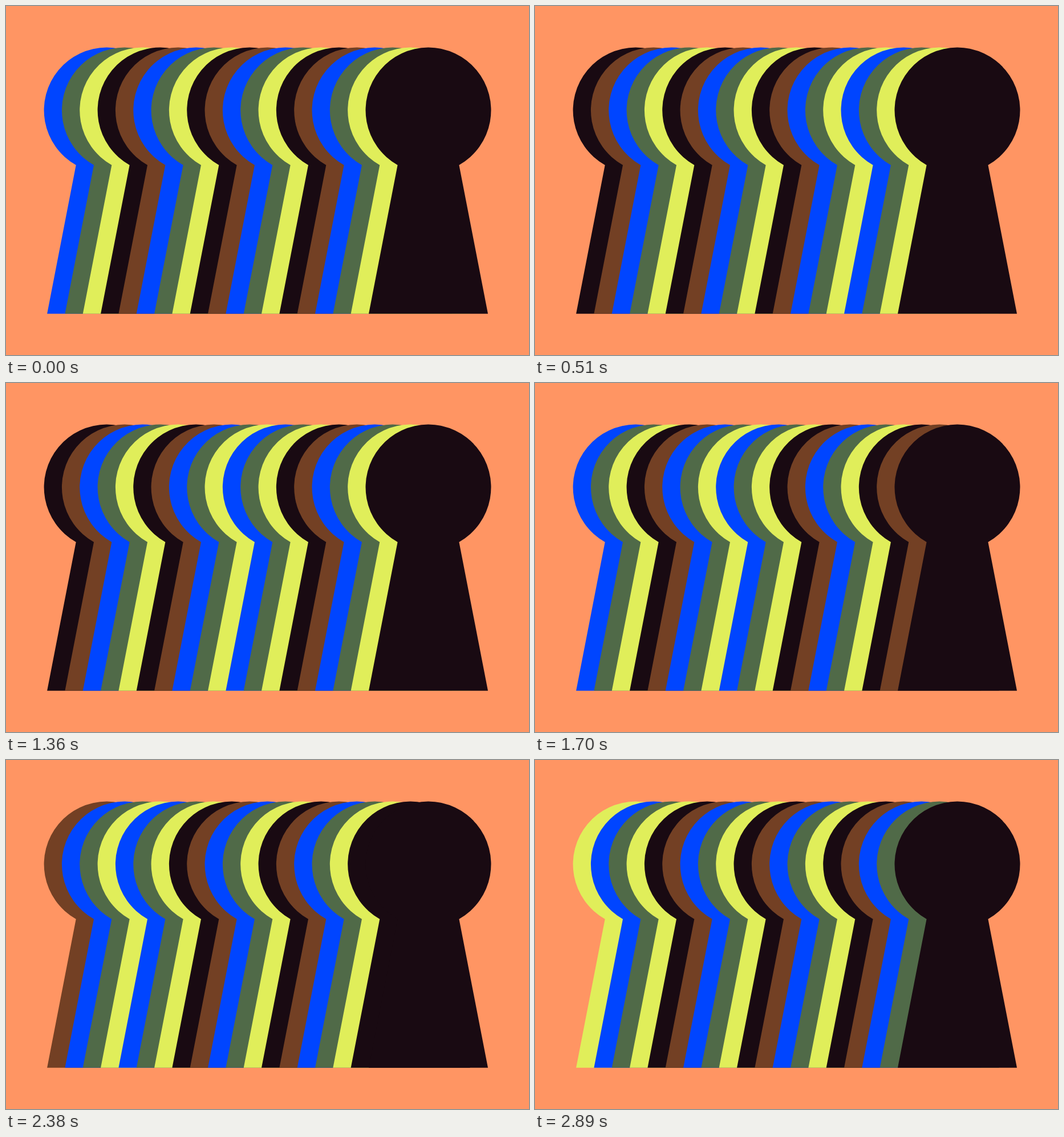
These frames come from a looping animation (917 by 611 pixels, 3.06 s). An HTML page:

```html
<!DOCTYPE html>
<html lang="en">
<head>
<meta charset="utf-8">
<title>Keyhole stripes</title>
<style>
  html, body { margin: 0; width: 100%; height: 100%; overflow: hidden; background: #ff9563; }
  svg { display: block; width: 100vw; height: 100vh; }
</style>
</head>
<body>
<svg id="stage" viewBox="0 0 917 611"></svg>
<script>
  const PALETTE = ['#0045ff', '#506a48', '#e0ee5a', '#190a12', '#734024'];
  const FRONT_COLOR = '#190a12';
  const COUNT = 18;
  const STEP_MS = 170;
  const FIRST_X = 176.6;
  const FRONT_X = 740.5;

  // Keyhole outline centred on x = 0: round head on a flared base.
  const KEYHOLE = 'M-104.5 538.8 L-53.9 278.4 A110 110 0 1 1 53.9 278.4 L104.5 538.8 Z';

  const stage = document.getElementById('stage');

  function addKeyhole(x) {
    const path = document.createElementNS('http://www.w3.org/2000/svg', 'path');
    path.setAttribute('d', KEYHOLE);
    path.setAttribute('transform', `translate(${x} 0)`);
    path.setAttribute('fill', FRONT_COLOR);
    stage.append(path);
    return path;
  }

  const spacing = (FRONT_X - FIRST_X) / COUNT;
  const stripes = Array.from({ length: COUNT }, (_, i) => addKeyhole(FIRST_X + i * spacing));
  addKeyhole(FRONT_X);

  // The row of colours moves one place to the left per step and wraps around.
  function render(time) {
    const step = Math.floor(time / STEP_MS) % COUNT;
    stripes.forEach((stripe, i) => {
      const slot = (i + step) % COUNT;
      stripe.setAttribute('fill', PALETTE[slot % PALETTE.length]);
    });
  }

  let start;
  function tick(now) {
    start ??= now;
    render(now - start);
    requestAnimationFrame(tick);
  }

  render(0);
  requestAnimationFrame(tick);
</script>
</body>
</html>
```
